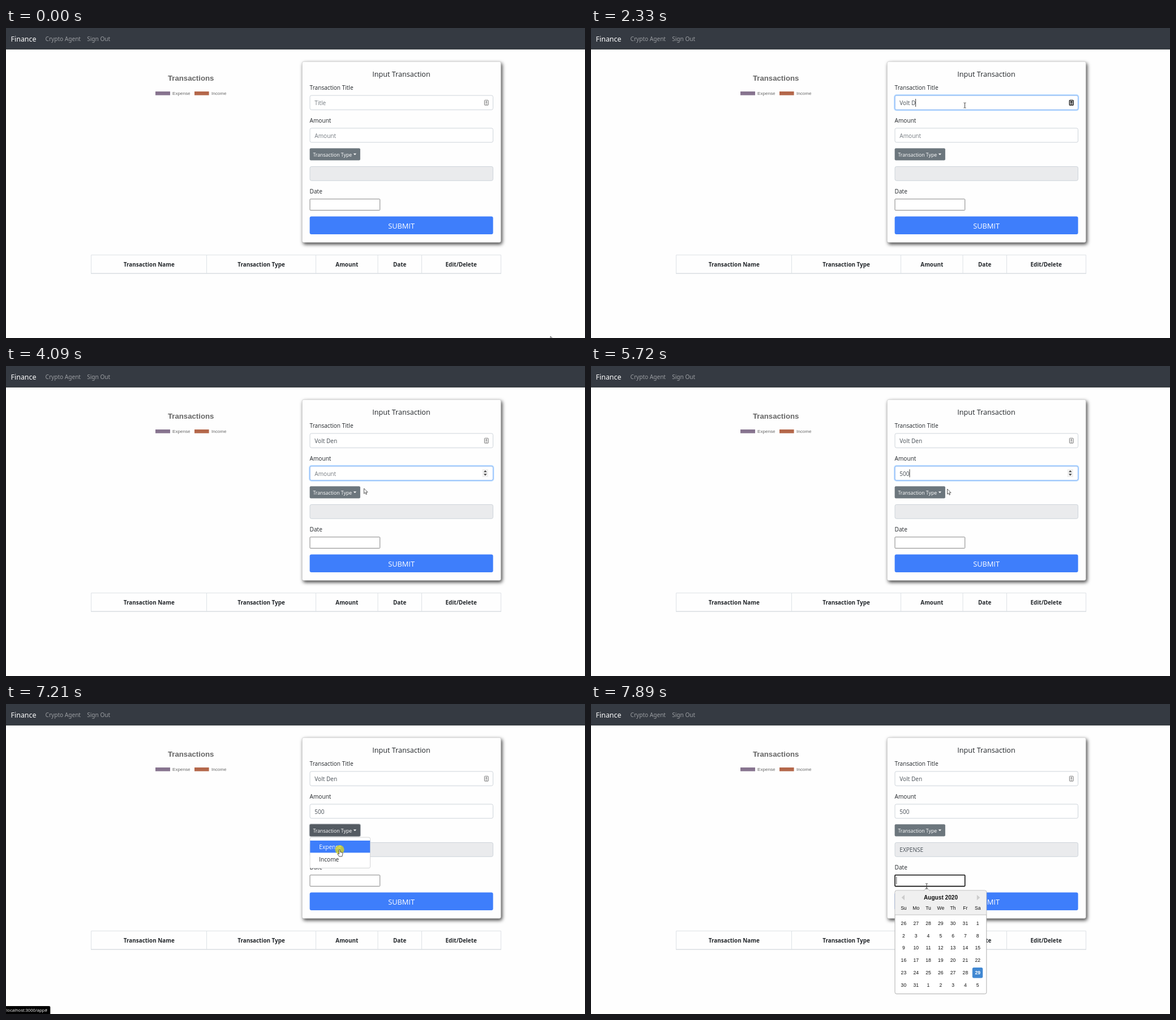
An HTML page for the animation above (8000 ms loop, 1023 by 547 pixels).

```html
<!DOCTYPE html>
<html lang="en">
<head>
<meta charset="utf-8">
<title>Finance</title>
<style>
html, body { margin: 0; width: 100%; height: 100%; overflow: hidden; background: #fefefe; }
svg { display: block; width: 1023px; height: 547px; }
text { font: 10.1px "Open Sans", "Noto Sans", sans-serif; fill: #212529; white-space: pre; }
.mid { text-anchor: middle; }
.nav text { font-family: "Noto Sans", "Open Sans", sans-serif; fill: #9a9da1; }
.nav .brand { font-size: 12.4px; fill: #fff; }
.chart text { font: 8.1px "Liberation Sans", Arial, sans-serif; fill: #666; }
.chart .head { font-size: 13.2px; font-weight: bold; }
.heading { font-size: 12.6px; font-weight: 500; }
.table text { font-size: 9.9px; font-weight: 700; }
.table path { fill: none; stroke: #dee2e6; }
.field { fill: #fff; stroke: #ced4da; }
.ring { fill: none; stroke: #bfdeff; stroke-width: 2; }
.ring + rect { fill: none; stroke: #80b4fb; }
.value { fill: #495057; }
.hint { fill: #757b81; }
.caret { fill: #222; }
.submit { font-size: 12.8px; fill: #fff; }
.button text { font-size: 8.75px; fill: #fff; }
.status text { font-size: 7.6px; fill: #fff; }
.calendar text { font: 8.6px "Liberation Sans", Arial, sans-serif; fill: #111; text-anchor: middle; }
.calendar .month { font-size: 10.1px; font-weight: bold; }
.calendar .chosen { font-weight: bold; fill: #fff; }
#card { filter: drop-shadow(2.5px 3px 3px rgba(0, 0, 0, .75)); }
</style>
</head>
<body>
<svg viewBox="0 0 1023 547">
  <g class="nav">
    <rect width="1023" height="37.5" fill="#353a42"/>
    <rect y="36.7" width="1023" height="1" fill="#292d33"/>
    <text class="brand" x="8.6" y="24.4">Finance</text>
    <text x="69.5" y="23.3">Crypto Agent</text>
    <text x="143.2" y="23.3">Sign Out</text>
  </g>

  <g class="chart">
    <text class="head mid" x="326.7" y="93.4">Transactions</text>
    <rect x="264" y="112" width="26" height="6.6" fill="#87748f"/>
    <text x="294" y="117.5">Expense</text>
    <rect x="333" y="112" width="25.6" height="6.6" fill="#b4674a"/>
    <text x="363" y="117.5">Income</text>
  </g>

  <g class="table">
    <path d="M150.5 400.5H874.5V433H150.5ZM354.5 400.5V433M547.5 400.5V433M657 400.5V433M734.5 400.5V433"/>
    <path d="M150 433.2H875" stroke-width="1.4"/>
    <g class="mid">
      <text x="252.8" y="421">Transaction Name</text>
      <text x="451" y="421">Transaction Type</text>
      <text x="602.3" y="421">Amount</text>
      <text x="695.6" y="421">Date</text>
      <text x="804.2" y="421">Edit/Delete</text>
    </g>
  </g>

  <rect id="card" x="523.3" y="59.3" width="351" height="319" rx="2.7" fill="#fefefe" stroke="#ccc" stroke-width=".7"/>
  <text class="heading mid" x="698.5" y="86.3">Input Transaction</text>
  <text x="536.6" y="109.3">Transaction Title</text>
  <text x="536.6" y="167.3">Amount</text>
  <text x="536.6" y="292.4">Date</text>

  <rect class="field" x="537" y="119" width="323.5" height="25.3" rx="2.7"/>
  <g id="titleRing">
    <rect class="ring" x="536" y="118" width="325.5" height="27.3" rx="3.7"/>
    <rect x="537" y="119" width="323.5" height="25.3" rx="2.7"/>
  </g>
  <text id="title" x="545.3" y="136.1"></text>
  <rect id="titleCaret" class="caret" y="125" width=".9" height="14"/>
  <g id="cardIcon" fill="none">
    <rect x="845.4" y="127.4" width="6.8" height="8.8" rx="1"/>
    <path d="M847.8 129.8H849.8V131.4H847.8ZM847 134H850.6"/>
  </g>

  <rect class="field" x="537" y="176.8" width="323.5" height="24.9" rx="2.7"/>
  <g id="amountRing">
    <rect class="ring" x="536" y="175.8" width="325.5" height="26.9" rx="3.7"/>
    <rect x="537" y="176.8" width="323.5" height="24.9" rx="2.7"/>
  </g>
  <text id="amount" x="545.3" y="193.7"></text>
  <rect id="amountCaret" class="caret" y="182.3" width=".9" height="14"/>
  <g id="spinner">
    <rect x="841.5" y="182" width="10.5" height="14" fill="#f1f1f1"/>
    <path d="M844 187.3L846.8 184 849.6 187.3ZM844 190.3L846.8 193.6 849.6 190.3Z" fill="#444"/>
  </g>

  <g class="button">
    <rect id="typeRing" x="535.5" y="211" width="91.5" height="23.5" rx="3.5" fill="#c0c4c8"/>
    <rect id="typeButton" x="536.6" y="212.2" width="89.3" height="21.2" rx="2"/>
    <text x="542.4" y="226.8">Transaction Type</text>
    <path d="M613.7 221.5H619.1L616.4 224.2Z" fill="#fff"/>
  </g>

  <rect x="537" y="244.5" width="323.5" height="24.8" rx="2.7" fill="#eaebed" stroke="#ced4da"/>
  <text id="kind" class="value" x="545.3" y="261.2">EXPENSE</text>

  <rect id="date" x="537" y="301.8" width="123.7" height="19.8" rx="1" fill="#fff"/>
  <rect id="dateCaret" class="caret" x="539.4" y="305" width=".8" height="13"/>

  <rect x="536.6" y="332.5" width="324" height="31.5" rx="3" fill="#3e7efb"/>
  <text class="submit mid" x="698.6" y="353.8">SUBMIT</text>

  <g id="menu">
    <rect x="537" y="235.2" width="106.5" height="54.3" rx="2.5" fill="#fff" stroke="#d4d5d6"/>
    <rect id="item" x="537.3" y="241" width="105.9" height="21.4"/>
    <text id="itemText" x="553.3" y="256">Expense</text>
    <text x="553.3" y="277.5">Income</text>
  </g>

  <g id="calendar" class="calendar">
    <rect x="537" y="329" width="161.8" height="182.5" rx="3" fill="#fff" stroke="#aeaeae"/>
    <path d="M537.5 371.8V331.5Q537.5 329.5 539.5 329.5H696.3Q698.3 329.5 698.3 331.5V371.8Z" fill="#f0f0f0"/>
    <path d="M537 372H698.8" stroke="#aeaeae" stroke-width=".8"/>
    <path d="M587.8 329.6L593.2 323.6 598.6 329.6" fill="#f0f0f0" stroke="#aeaeae" stroke-width=".8"/>
    <path d="M554 336.7V346.3L548.6 341.5ZM681.8 336.7V346.3L687.2 341.5Z" fill="#ccc"/>
    <text class="month" x="618" y="345.3">August 2020</text>
    <rect x="673.8" y="465" width="18.4" height="18.4" rx="2.6" fill="#4188d2"/>
  </g>

  <g id="status" class="status">
    <path d="M0 533H76Q78.3 533 78.3 535V547H0Z"/>
    <text x=".7" y="543">localhost:3000/app#</text>
  </g>

  <g id="pointer">
    <circle id="press" r="8" fill="#f2e400" fill-opacity=".68"/>
    <path id="arrow" d="M0 0V9.2L2.1 7.2 3.6 10.6 5 10 3.6 6.7H6.6Z" fill="#fff" stroke="#333" stroke-width=".8"/>
    <path id="beam" d="M-2-4.5H-.6L0-4 .6-4.5H2M0-4V4M-2 4.5H-.6L0 4 .6 4.5H2" fill="none" stroke="#333" stroke-width=".9"/>
    <path id="hand" d="M0 0C.8 0 1.1.5 1.1 1.2V4.2L4.5 5C5.3 5.2 5.6 5.8 5.5 6.6L5 9.5 4.2 12H-.8L-3.5 8.2C-4 7.4-3.2 6.6-2.4 7.1L-1.1 8V1.2C-1.1.5-.8 0 0 0Z" fill="#fff" stroke="#222" stroke-width=".8"/>
  </g>
</svg>

<script>
const LOOP = 8000;
const $ = id => document.getElementById(id);
const set = (id, attrs) => { for (const k in attrs) $(id).setAttribute(k, attrs[k]); };
const show = (id, on) => set(id, { opacity: Number(on) });
const within = (t, spans) => spans.some(([a, b]) => t >= a && t < b);

// start, end, number of jumps, x, y
const START = [962, 544];
const MOVES = [
  [70, 451, 6, 660.5, 136.5],
  [3170, 3480, 5, 633, 199.5],
  [3930, 4090, 3, 632.5, 216],
  [5720, 5720, 1, 629.5, 217],
  [5797, 5951, 3, 558, 233],
  [6490, 6560, 2, 589.5, 250],
  [6650, 6740, 2, 589.5, 257],
  [7362, 7588, 4, 593, 321.5]
];
const PRESSES = [[527, 680], [3550, 3710], [6029, 6183], [7210, 7286], [7664, 7890]];
const CARETS = {
  title: [[603, 1070], [1140, 3403]],
  amount: [[3550, 4090], [4630, 5797]]
};
const TYPED = {
  title: { text: "Volt Den", hint: "Title", keys: [1140, 1320, 1380, 1620, 2080, 2330, 2620, 2850] },
  amount: { text: "500", hint: "Amount", keys: [4950, 5100, 5250] }
};
// left, top, right, bottom
const AREAS = {
  title: [537, 118, 861, 145], amount: [537, 176, 861, 202], date: [537, 301, 661, 322],
  type: [536, 212, 626, 234], menu: [537, 235, 644, 290], submit: [536, 332, 861, 364]
};

function addDays() {
  const add = (text, col, y, chosen) => {
    const el = document.createElementNS("http://www.w3.org/2000/svg", "text");
    el.textContent = text;
    el.setAttribute("x", 552.4 + col * 21.8);
    el.setAttribute("y", y);
    if (chosen) el.setAttribute("class", "chosen");
    $("calendar").append(el);
  };
  "Su Mo Tu We Th Fr Sa".split(" ").forEach((name, col) => add(name, col, 363));
  for (let i = 0; i < 42; i++) {
    const day = new Date(2020, 6, 26 + i).getDate();
    add(day, i % 7, 389.7 + Math.floor(i / 7) * 21.85, i === 34);
  }
}

function pointerAt(t) {
  let [x, y] = START;
  for (const [start, end, jumps, toX, toY] of MOVES) {
    if (t < start) break;
    const jump = t >= end ? jumps : 1 + Math.floor((t - start) / (end - start) * (jumps - 1));
    const p = jump / jumps, e = p * p * (3 - 2 * p);
    x += (toX - x) * e;
    y += (toY - y) * e;
  }
  return [x, y];
}

function fade(t, on, off) {
  const ramp = start => Math.min(1, Math.max(0, (t - start) / 150));
  return ramp(on) * (1 - ramp(off));
}

function drawInput(id, t) {
  const { text, hint, keys } = TYPED[id];
  const count = keys.filter(k => k <= t).length;
  const el = $(id);
  el.textContent = count ? text.slice(0, count) : hint;
  el.setAttribute("class", count ? "value" : "hint");
  set(id + "Caret", { x: 545.2 + (count ? el.getComputedTextLength() : 0) });
  show(id + "Caret", within(t, CARETS[id]));
}

function draw(t) {
  const [x, y] = pointerAt(t);
  const over = id => {
    const [l, top, r, b] = AREAS[id];
    return x >= l && x <= r && y >= top && y <= b;
  };

  drawInput("title", t);
  drawInput("amount", t);
  show("titleRing", fade(t, 527, 3560));
  show("amountRing", fade(t, 3560, 6029));
  show("spinner", over("amount") || within(t, [[3550, 6029]]));
  set("cardIcon", over("title")
    ? { stroke: "#222", "stroke-width": 1.5 }
    : { stroke: "#777", "stroke-width": 1 });

  const open = within(t, [[6106, 7286]]);
  const pressed = within(t, PRESSES);
  show("menu", open);
  show("typeRing", within(t, [[6029, 7664]]));
  set("typeButton", { fill: open ? "#545b62" : over("type") ? "#5f676e" : "#6c767d" });
  const active = open && pressed && over("menu");
  set("item", { fill: active ? "#3e7efb" : over("menu") ? "#f8f9fa" : "#fff" });
  $("itemText").style.fill = active ? "#fff" : "";
  show("kind", t >= 7286);

  const dated = t >= 7664;
  set("date", dated ? { stroke: "#111", "stroke-width": 1.6 } : { stroke: "#858585", "stroke-width": 1 });
  show("dateCaret", dated);
  show("calendar", t >= 7739);
  show("status", t < 6890 || t >= 7739 ? 0 : t < 6980 ? 0.5 : 1);

  const beam = over("title") || over("amount") || over("date");
  const hand = over("type") || over("submit") || (open && over("menu"));
  set("pointer", { transform: `translate(${x} ${y})` });
  show("press", pressed);
  show("beam", beam);
  show("hand", hand && !beam);
  show("arrow", !hand && !beam);
}

addDays();
const began = performance.now();
function tick() {
  draw((performance.now() - began) % LOOP);
  requestAnimationFrame(tick);
}
tick();
</script>
</body>
</html>
```
